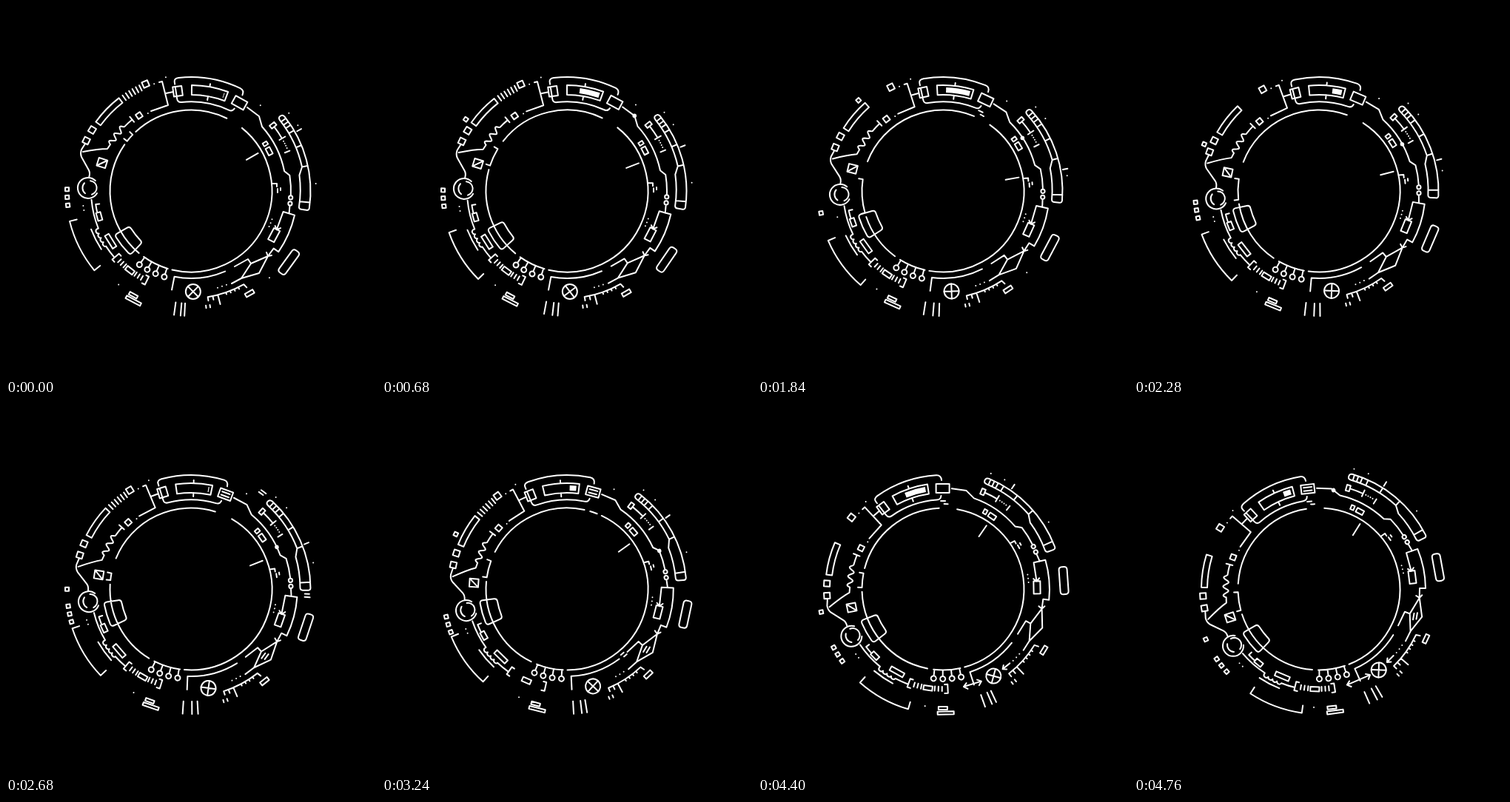
An HTML page for the animation above (4800 ms loop, 500 px wide and 500 px high).

```html
<!DOCTYPE html>
<html lang="en">
<head>
<meta charset="utf-8">
<title>Rotating HUD ring</title>
<style>
html, body { margin: 0; width: 100%; height: 100%; overflow: hidden; background: #000; }
svg { display: block; width: 100%; height: 100%; }
.line { fill: none; stroke: #fff; stroke-width: 2; stroke-linecap: round; stroke-linejoin: round; }
.solid { fill: #fff; }
</style>
</head>
<body>
<svg viewBox="0 0 500 500">
  <g id="hud">
    <path id="fixed" class="line"/>
    <path id="moving" class="line"/>
    <path id="fill" class="solid"/>
  </g>
</svg>
<script>
const LOOP = 4800, STEP = 40, C = 250, RING = 109.5;
const WHEEL = { r: 136, a: 178.8 };
const RAD = Math.PI / 180;
const $ = id => document.getElementById(id);

// Polar helpers: angles are compass bearings in degrees, clockwise from the top.
const n = v => v.toFixed(2);
const P = (r, a) => n(C + r * Math.sin(a * RAD)) + ' ' + n(C - r * Math.cos(a * RAD));
const turn = (r, a, b) =>
  `A${r} ${r} 0 ${Math.abs(b - a) > 180 ? 1 : 0} ${b > a ? 1 : 0} ${P(r, b)}`;
const arc = (r, a, b) => 'M' + P(r, a) + turn(r, a, b);
const spoke = (a, r0, r1) => `M${P(r0, a)}L${P(r1, a)}`;
const dot = (r, a) => `M${P(r, a)}h.01`;
const deg = (px, r) => px / r / RAD;
const dash = (r, a, px) => arc(r, a - deg(px / 2, r), a + deg(px / 2, r));
const circle = (r, a, s) => {
  const x = C + r * Math.sin(a * RAD), y = C - r * Math.cos(a * RAD);
  return `M${n(x - s)} ${n(y)}a${s} ${s} 0 1 0 ${2 * s} 0a${s} ${s} 0 1 0 ${-2 * s} 0`;
};

// Straight box facing the centre: w along the ring, h across it.
function local(r, a, x, y) {
  const s = Math.sin(a * RAD), c = Math.cos(a * RAD);
  return n(C + (r + y) * s + x * c) + ' ' + n(C - (r + y) * c + x * s);
}
function box(r, a, w, h, k = 0) {
  const x = w / 2, y = h / 2, q = (i, j) => local(r, a, i, j);
  return `M${q(-x + k, y)}L${q(x - k, y)}Q${q(x, y)} ${q(x, y - k)}` +
    `L${q(x, k - y)}Q${q(x, -y)} ${q(x - k, -y)}L${q(k - x, -y)}` +
    `Q${q(-x, -y)} ${q(-x, k - y)}L${q(-x, y - k)}Q${q(-x, y)} ${q(-x + k, y)}Z`;
}

// Curved box between two radii, with optional corner size k.
function sector(r0, r1, a, b, k = 0) {
  const d0 = deg(k, r0), d1 = deg(k, r1);
  return arc(r1, a + d1, b - d1) + `Q${P(r1, b)} ${P(r1 - k, b)}L${P(r0 + k, b)}` +
    `Q${P(r0, b)} ${P(r0, b - d0)}` + turn(r0, b - d0, a + d0) +
    `Q${P(r0, a)} ${P(r0 + k, a)}L${P(r1 - k, a)}Q${P(r1, a)} ${P(r1, a + d1)}Z`;
}
const list = (count, fn) => Array.from({ length: count }, (_, i) => fn(i)).join('');

function wave() {
  return list(31, i => (i ? 'L' : 'M') +
    P(126 + 3.6 * Math.sin(i / 30 * Math.PI * 5), -46.5 - i * 13.5 / 30));
}
function spring() {
  return 'M' + P(137, 248) + list(4, i => `A3.4 3.4 0 0 0 ${P(137, 245.2 - i * 2.75)}`);
}

function topParts() {
  return 'M' + P(146, -8.6) + `L${P(149, -8.6)}Q${P(154, -8.6)} ${P(154, -6.2)}` +
    turn(154, -6.2, 25.6) + `Q${P(154, 28)} ${P(147, 28.2)}` +
    'M' + P(129, -8.6) + `L${P(126, -8.6)}Q${P(120.7, -8.6)} ${P(120.7, -6)}` +
    turn(120.7, -6, 25) + `Q${P(120.7, 27.5)} ${P(126, 27.8)}` +
    box(136, -7.6, 12, 13) + spoke(-8.6, 129.5, 142.5) + box(136, 28.8, 18, 12) +
    sector(130, 143, .4, 20.5) + spoke(10.2, 143, 147) + spoke(10.2, 125, 130) +
    'M207 103L211 102L219 134L196 142M216 118L226 116' +
    dot(153, -19) + dot(157.5, -12.5) + dot(120, -29) +
    box(123.7, -34.5, 7, 7) + spoke(-39.5, 121, 130) + arc(125, -46, -39.5) + wave() +
    'M141 187L137 193Q125 193 104 197' +
    box(157, -23, 8, 8) + sector(151, 159, -54, -37.8) +
    box(157, -58.3, 8, 8) + box(157, -64.3, 8, 8);
}
function leftParts() {
  return 'M107 186L102 194Q100 199 102 204L112 222Q114 226 112 232' +
    'M123 253A14 14 0 1 1 120.8 236' +
    'M114 236.2A9.5 9.5 0 0 1 116 254.7M107 253.2A9.5 9.5 0 0 1 106 239.2' +
    box(126, -72.5, 11, 12) + box(167.5, -96.6, 5, 5) + dot(147, -100.2) +
    arc(135, 265, 248) + `L${P(137, 248)}` + spring() + arc(137, 237, 229) +
    'M' + P(125, 262) + `L${P(130, 262)}` + turn(130, 262, 257) +
    box(128.7, 254.5, 11, 6) + arc(144.5, 237, 249) + box(128, 238, 20, 6) +
    box(135.3, 217.6, 12, 6) +
    [-1, 1].map(s => {
      const a = 217.6 + s * 11.4, b = a - s * 1.8;
      return `M${P(129, b)}L${P(129, a)}L${P(141, a)}L${P(141, b)}`;
    }).join('') +
    arc(RING, 196.6, 215.7) +
    list(4, i => spoke(197.3 + i * 5.9, RING, 118) + circle(121.5, 197.3 + i * 5.9, 3.5)) +
    box(161, 209, 12, 4) + box(167.5, 207.7, 22, 4) + dot(160, 217.7);
}
function bottomParts() {
  return 'M' + P(136, 191) + `L${P(118, 191)}` + turn(118, 191, 157) +
    circle(WHEEL.r, WHEEL.a, 10) +
    'M' + P(150, 171) + `L${P(145, 171)}` + turn(145, 171, 150.5) + `L${P(150.5, 150)}` +
    spoke(168.3, 145, 150) + spoke(165.5, 145, 158) +
    list(4, i => spoke(161 - i * 2.4, 145, 147.5)) +
    spoke(172.6, 156, 159.5) + spoke(170.6, 156, 159.5) +
    list(3, i => dot(135.5, 164.6 - i * 2.65)) + box(159.4, 150.2, 12, 5) +
    'M309 352L327 342L331 348L318 368L342 361L354 338L331 348M318 368L305 375';
}
function rightParts() {
  return 'M326 137L342 149L346 163' + turn(129, 47.8, 78) + `L${P(135, 81)}` +
    turn(135, 81, 92.7) + circle(135, 93.8, 2.6) + circle(135, 97.2, 2.6) +
    spoke(98.5, 135, 135) + `L${P(136, 103)}` +
    'M' + P(127, 114.3) + `L${P(127.7, 102.7)}L${P(143.8, 103.1)}` +
    turn(144, 103.1, 124.8) + `L${P(136, 124.8)}L354 338M352 333L354 338L359 337` +
    `M${P(131, 112.5)}L${P(127, 114.3)}L${P(123, 112.5)}` +
    box(127, 118, 17, 9) + list(3, i => dot(116, 109.3 + i * 2.6)) +
    // banded arm
    arc(161.5, 51.6, 98.2) + `Q${P(161.5, 99.4)} ${P(158, 99.4)}L${P(151, 99.4)}` +
    `Q${P(147.5, 99.4)} ${P(147.5, 98)}` + turn(148, 98, 81.7) + `L${P(153.5, 77.8)}` +
    turn(153.5, 77.8, 51.6) + `Q${P(153.5, 50)} ${P(157, 50)}Q${P(161.5, 50)} ${P(161.5, 51.6)}` +
    [52.5, 54.5, 56.5, 59.5, 67.5, 77.8].map(a => spoke(a, 153.5, 161.5)).join('') +
    spoke(95.5, 148, 161.5) +
    dot(169, 51.5) + dot(169.5, 58.4) + dot(169, 86.6) +
    // inner probe
    box(142, 51.3, 5, 8) + arc(142, 52.4, 60) + spoke(60, 138, 147) +
    list(4, i => dot(142, 61.7 + i * 1.4)) + spoke(67.8, 137, 144) +
    box(119, 57.6, 4.5, 6) + box(118.5, 63, 10, 6) +
    'M359.5 240H366V244M367 247V252M371 246V249';
}
$('fixed').setAttribute('d', topParts() + leftParts() + bottomParts() + rightParts());

// Smooth curve through one value per time mark.
const MARKS = [0, 1280, 1840, 2680, 3240, 4000, 4760];
function key(t, v) {
  const last = MARKS.length - 1;
  let i = 0;
  while (i < last - 1 && t > MARKS[i + 1]) i++;
  const slope = j => {
    const a = Math.max(j - 1, 0), b = Math.min(j + 1, last);
    if (j > 0 && j < last && (v[j] - v[a]) * (v[b] - v[j]) <= 0) return 0;
    return (v[b] - v[a]) / (MARKS[b] - MARKS[a]);
  };
  const h = MARKS[i + 1] - MARKS[i], u = (t - MARKS[i]) / h, w = u * u * (3 - 2 * u);
  return v[i] + (v[i + 1] - v[i]) * w +
    h * u * (1 - u) * ((1 - u) * slope(i) - u * slope(i + 1));
}
// True inside any of the [from, to) pairs.
const on = (t, ...s) => s.some((a, i) => i % 2 === 0 && t >= a && t < s[i + 1]);

function ring(t) {
  const b0 = key(t, [-46, -69, -78, -70, -56, -45, -57]);
  const b1 = key(t, [-52, -88, -102, -75, -68, -53, -70]);
  const end = key(t, [-43, -59, -65, -59, -49, -43, -51]);
  return arc(RING, 39, 193.5) + arc(RING, end, 26.2) + arc(RING, -140, b1 - 3) +
    `M${P(115, b0)}L${P(RING, b0)}` + turn(RING, b0, b1) + `L${P(115, b1)}`;
}
function runner(t) {
  const a = 32 + 15.2 * (t % 4000) / 1000;
  if (a < 39) return '';
  const r = a < 42.3 ? 136 : a < 47.8 ? 136.6 - (a - 42.3) * 1.38 :
    a < 78 ? 129 : a < 81 ? 129 + (a - 78) * 2 : 135;
  return circle(r, a, 2.8);
}
function crossLines(t, theta) {
  const a = key(t, [45, 63, 88, 98, 133, 118, 92]) + theta - WHEEL.a;
  return [a, a + 90].map(b => {
    const x = 10 * Math.cos(b * RAD), y = 10 * Math.sin(b * RAD);
    return `M${local(WHEEL.r, WHEEL.a, x, -y)}L${local(WHEEL.r, WHEEL.a, -x, y)}`;
  }).join('');
}
function arrow(t) {
  const w = (t - 3390) / 190;
  let d = '';
  if (w > 0) {
    const a = 191.7 - w, b = 191.7 + w;
    d = `M${P(135, a)}L${P(135, b)}`;
    if (w > 4.5) d += `M${P(139, a + 2)}L${P(135, a)}L${P(131, a + 2)}` +
      `M${P(139, b - 2)}L${P(135, b)}L${P(131, b - 2)}`;
  }
  if (t >= 4400) d += `M${P(135, 167)}L${P(135, 172.3)}` +
    `M${P(138.5, 170.5)}L${P(135, 172.3)}L${P(131.5, 170.5)}`;
  return d;
}

function flickers(t) {
  let d = '';
  if (on(t, 0, 700, 2300, 4400)) d += list(6, i => spoke(-35.6 + i * 1.9, 151, 159));
  if (!on(t, 2960, 3560)) d += [-8.1, -6, -3.9, 3.9, 6, 8.1]
    .map(a => spoke(217.6 + a, 132, 138)).join('');
  if (!on(t, 1600, 2240)) d += box(167.5, -89.2, 5, 5) + box(167.5, -92.9, 5, 5) + dot(147, -97.8);
  if (on(t, 2400, 3600, 4440, LOOP)) {
    d += [-2.3, 2.3].map(y =>
      `M${local(136, 28.8, -5.5, y)}L${local(136, 28.8, 5.5, y)}`).join('') +
      'M330 357L336 351M334 359L340 353';
  }
  if (on(t, 800, 1600, 3640, 4400)) d += list(3, i => dash(111 + i * 4, 31, 9));
  if (on(t, 1600, 2240, 4400, LOOP)) d += dash(115, 31, 5) + dash(119, 29, 6);
  if (on(t, 2960, 3560)) d += arc(RING, 30.3, 35.5);
  if (on(t, 1000, 1560, 2400, 2960)) d += dash(160, 45, 7) + dash(164, 45.5, 8) +
    spoke(101.2, 154, 160) + spoke(102.8, 154, 161);
  if (on(t, 1000, 1600, 3000, 4240)) d += dash(115, 153.2, 5) + dash(119.5, 152.4, 5);
  if (on(t, 0, 600, 1600, 2200)) d += dot(158, 137.9);
  if (t < 4400) d += dot(149, 39);
  const flip = t < 2280 ? -1 : 1;
  return d + `M${local(126, -72.5, -5 * flip, -5.5)}L${local(126, -72.5, 5 * flip, 5.5)}`;
}

function draw(t) {
  const s = t / LOOP, theta = 18.15 * s * s + 17.8 * s * s * s;
  $('hud').setAttribute('transform', `rotate(${(-theta).toFixed(3)} ${C} ${C})`);

  const hand = key(t, [60.6, 76.8, 83.5, 77.2, 68, 60.6, 67.4]);
  const screen = key(t, [231.8, 241.5, 249.6, 261.7, 267.8, 271.4, 267]);
  const rail = 270 - key(t, [14, 21.5, 19.7, 9.6, 8.7, 16.8, 21.5]);
  const pill = 126 - key(t, [0, 2.2, 4.4, 8.8, 10.2, 10.9, 11.1]);
  const fan = key(t, [0, 1, 1, 1, .6, 0, .75]);
  const hop = key(t, [-60, -48.5, -39.3, -81.3, -50, -64, -78.8]);

  let d = ring(t) + flickers(t) + crossLines(t, theta) + arrow(t) +
    spoke(hand, 86, 104) + spoke(hand, 164.5, 171) +
    sector(95.5, 119, screen - 8.3, screen + 8.3, 4) +
    `M${P(159, rail)}L${P(169, rail)}` + turn(169, rail, rail - 25.4) + `L${P(159, rail - 25.4)}` +
    box(163.5, pill, 37, 11, 4) +
    spoke(187.8 + 4.8 * fan, 152, 169) + spoke(184.8 + 3.5 * fan, 152, 169) +
    spoke(183 + 2.5 * fan, 152, 169);
  if (!on(t, 0, 400, 3720, 4280)) d += box(167.5, hop, 5, 5);
  $('moving').setAttribute('d', d);

  const level = Math.min(1, Math.max(.02, key(t, [.02, 1, .8, .03, .22, 1, .25])));
  $('fill').setAttribute('d', sector(133, 140, 19 - 17 * level, 19) + runner(t));
}

const start = performance.now();
function tick() {
  const t = (performance.now() - start) % LOOP;
  draw(Math.floor(t / STEP) * STEP);
  requestAnimationFrame(tick);
}
draw(0);
requestAnimationFrame(tick);
</script>
</body>
</html>
```
